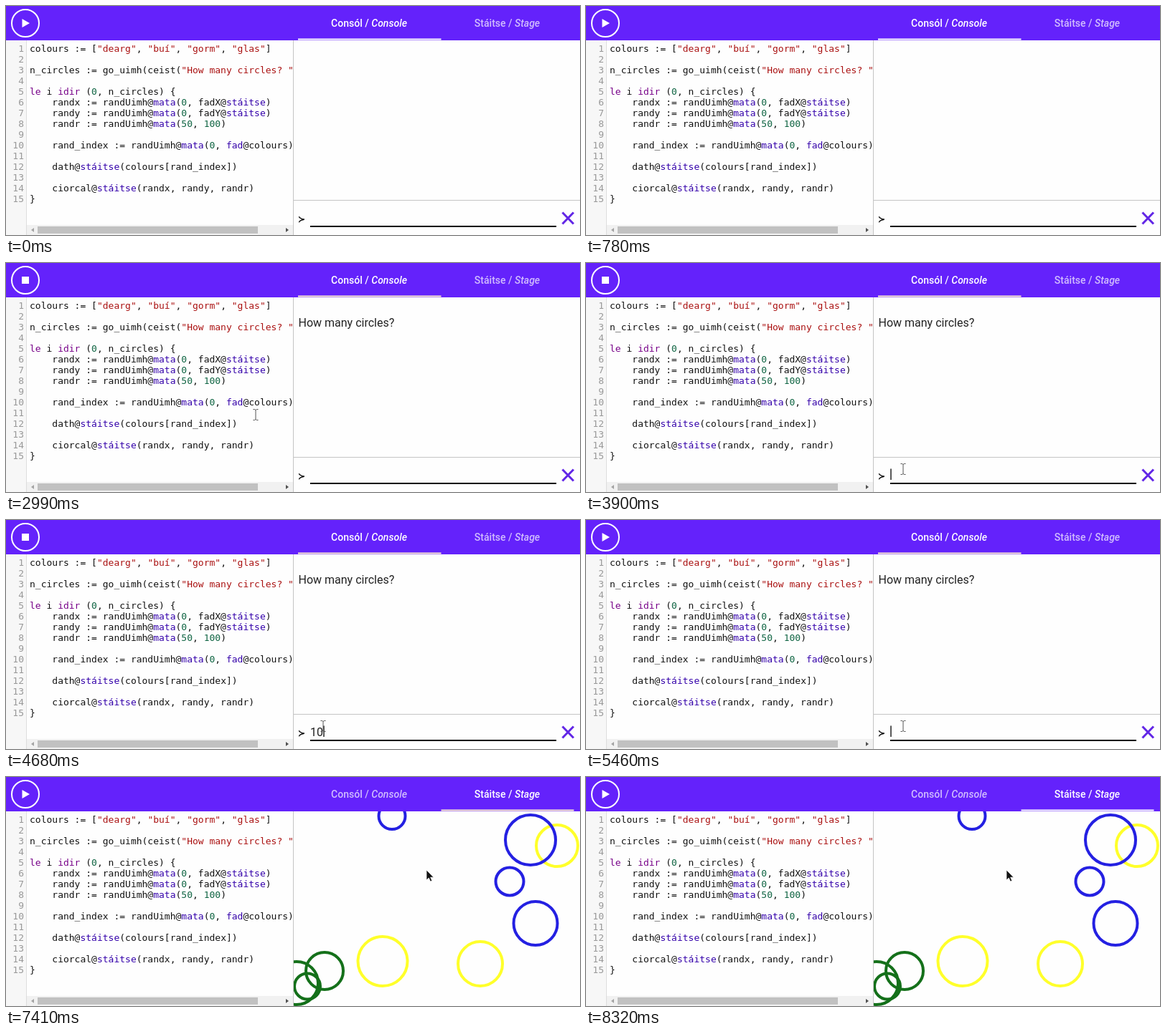
Animation of 800x320 px, one loop 8450 ms. Source, as an HTML page:

```html
<!DOCTYPE html>
<html lang="ga">
<head>
<meta charset="utf-8">
<title>Circles on the stage</title>
<style>
html, body { margin: 0; width: 100%; height: 100%; overflow: hidden; background: #fff; }
#app { position: relative; width: 800px; height: 320px; overflow: hidden; background: #fefefe; }
#app > * { position: absolute; }
#gutter { left: 0; top: 48px; width: 28px; height: 272px; background: #f7f7f7; border-right: 1px solid #ddd; }
pre { margin: 0; top: 52px; font: 13px/15px "DejaVu Sans Mono", monospace; color: #111; }
#numbers { left: 0; width: 25px; text-align: right; color: #999; }
#code { left: 33px; width: 367px; overflow: hidden; }
.string { color: #a11; } .keyword { color: #708; } .builtin { color: #30a; } .number { color: #164; }
svg { left: 0; top: 0; }
.tab { font: 500 14px Roboto, sans-serif; fill: #fff; text-anchor: middle; }
.tab tspan { font-style: italic; }
.console { font: 16px Roboto, sans-serif; fill: #212121; }
.prompt { font: 12px "DejaVu Sans", sans-serif; }
</style>
</head>
<body>
<div id="app">
  <div id="gutter"></div>
  <pre id="numbers"></pre>
  <pre id="code"></pre>
  <svg width="800" height="320" viewBox="0 0 800 320">
    <defs><clipPath id="pane"><path d="M401 48H800V320H401Z"/></clipPath></defs>

    <path d="M29 306H400V320H29Z" fill="#f1f1f1"/>
    <path d="M44 308H351V318H44Z" fill="#c1c1c1"/>
    <path d="M39 310V316L35 313Z" fill="#a3a3a3"/>
    <path d="M390 310V316L394 313Z" fill="#505050"/>
    <path d="M400.5 48V320" stroke="#c4c4c4"/>

    <path d="M0 0H800V48H0Z" fill="#6422fb"/>
    <circle cx="27" cy="24" r="19" fill="none" stroke="#fff" stroke-width="2"/>
    <path id="play" d="M22.5 18V30L33 24Z" fill="#fff"/>
    <path id="stop" d="M22 19H32V29H22Z" fill="#fff"/>
    <text id="consoleTab" class="tab" x="506" y="28.5">Consól / <tspan>Console</tspan></text>
    <text id="stageTab" class="tab" x="698.5" y="28.5">Stáitse / <tspan>Stage</tspan></text>
    <rect id="underline" y="45.5" height="2"/>

    <g id="console">
      <text id="question" class="console" x="407.5" y="89">How many circles?</text>
      <path d="M401 271.5H800" stroke="#c4c4c4"/>
      <text class="prompt" x="407" y="302" stroke="#000" stroke-width=".4">≻</text>
      <path d="M424 308H767" stroke="#000" stroke-width="2"/>
      <path d="M775.5 288.5L791 304.5M791 288.5L775.5 304.5" stroke="#6226e6" stroke-width="3"/>
      <text id="typed" class="console" x="424" y="302"></text>
      <path id="caret" d="M425 287.5V303" stroke="#000" stroke-width="1.3"/>
    </g>
    <g id="stage" clip-path="url(#pane)" fill="none" stroke-width="4"></g>

    <g id="pointer">
      <path id="beam" d="M-3.5 -7.5H-1.5L0 -6.5L1.5 -7.5H3.5M0 -6.5V6.5M-3.5 7.5H-1.5L0 6.5L1.5 7.5H3.5" fill="none" stroke="#555"/>
      <path id="arrow" d="M0 0V14L3.3 11L5.5 16L7.8 15L5.6 10.2H10Z" fill="#111" stroke="#fff" stroke-width=".7"/>
      <path id="hand" d="M-1.5 1Q0 -1 1.5 1V6L8 7.5Q9.5 8 9 11L7.5 16H0L-5 10Q-4 7.5 -1.5 9.5Z" fill="#111" stroke="#fff"/>
    </g>
  </svg>
</div>
<script>
const $ = id => document.getElementById(id);
const LOOP = 8450, STEP = 130;

const program = `colours := ["dearg", "buí", "gorm", "glas"]

n_circles := go_uimh(ceist("How many circles? "))

le i idir (0, n_circles) {
    randx := randUimh@mata(0, fadX@stáitse)
    randy := randUimh@mata(0, fadY@stáitse)
    randr := randUimh@mata(50, 100)

    rand_index := randUimh@mata(0, fad@colours)

    dath@stáitse(colours[rand_index])

    ciorcal@stáitse(randx, randy, randr)
}`;
const token = /(?<string>"[^"]*")|(?<keyword>\b(?:le|idir)\b)|(?<builtin>mata|stáitse|\bfad(?=@))|(?<number>\b\d+)/g;
$('code').innerHTML = program.replace(token, (text, ...rest) => {
  const groups = rest.at(-1);
  const kind = Object.keys(groups).find(name => groups[name]);
  return `<span class="${kind}">${text}</span>`;
});
$('numbers').textContent = program.split('\n').map((_, i) => i + 1).join('\n');

const BLUE = '#2420e2', YELLOW = '#ffff2a', GREEN = '#14701a';
const circles = [
  [538, 54.5, 18.5, BLUE], [768, 96, 29, YELLOW], [731, 88, 35, BLUE],
  [702, 146, 19.5, BLUE], [738, 204.5, 30.5, BLUE], [525, 257.5, 34.5, YELLOW],
  [661, 261, 31, YELLOW], [444, 271, 26, GREEN], [405, 288, 30, GREEN], [420, 292.5, 18, GREEN]
];
$('stage').innerHTML = circles.map(([x, y, r, colour]) =>
  `<circle cx="${x}" cy="${y}" r="${r}" stroke="${colour}"/>`).join('');

// time, x, y
const path = [
  [1040, 330, 325], [1560, 214, 104], [2080, 31, 27], [2470, 31, 27],
  [2990, 348, 212], [3510, 442, 288], [5590, 442, 288],
  [6240, 700, 30], [6630, 700, 30], [7280, 586, 130], [LOOP, 586, 130]
];
const RUN = 2340, FOCUS = 3640, ENTER = 5200, SWITCH = 6500;
const caretOn = [[FOCUS, 4160], [4420, 5720], [6240, SWITCH]];

const within = (t, from, to) => t >= from && t < to;
const show = (id, on) => $(id).style.display = on ? '' : 'none';
const mix = (a, b, p) => a + (b - a) * p;
const ease = p => p * p * (3 - 2 * p);
const clamp = p => Math.max(0, Math.min(1, p));

function pointerAt(t) {
  const i = path.findIndex(([end]) => t < end);
  const [t0, x0, y0] = path[i - 1], [t1, x1, y1] = path[i];
  const p = (t - t0) / (t1 - t0);
  return [mix(x0, x1, p), mix(y0, y1, p)];
}

function pointerKind(x, y) {
  if (y < 48) return x < 47 || x > 407 ? 'hand' : 'arrow';
  if (x < 400) return y < 306 ? 'beam' : 'arrow';
  return y > 284 && x > 424 && x < 767 ? 'beam' : 'arrow';
}

function draw(t) {
  const running = within(t, RUN, ENTER), onStage = t >= SWITCH;
  show('play', !running);
  show('stop', running);
  show('question', t >= RUN);
  show('console', !onStage);
  show('stage', onStage);
  $('consoleTab').setAttribute('fill-opacity', onStage ? .7 : 1);
  $('stageTab').setAttribute('fill-opacity', onStage ? 1 : .7);

  const slide = ease(clamp((t - SWITCH) / 260));
  $('underline').setAttribute('x', mix(407, 606.5, slide));
  $('underline').setAttribute('width', mix(199.5, 185, slide));
  $('underline').setAttribute('fill', within(t, 910, 7930) ? '#fff0d0' : '#fff');

  const typed = t >= ENTER ? '' : t >= 4680 ? '10' : t >= 4420 ? '1' : '';
  $('typed').textContent = typed;
  $('caret').setAttribute('transform', `translate(${typed.length * 9} 0)`);
  show('caret', caretOn.some(([from, to]) => within(t, from, to)));

  const visible = t >= path[0][0];
  show('pointer', visible);
  if (visible) {
    const [x, y] = pointerAt(t), kind = pointerKind(x, y);
    $('pointer').setAttribute('transform', `translate(${x} ${y})`);
    for (const id of ['beam', 'arrow', 'hand']) show(id, id === kind);
  }
}

const start = performance.now();
function tick() {
  const t = (performance.now() - start) % LOOP;
  draw(Math.floor(t / STEP) * STEP);
  requestAnimationFrame(tick);
}
tick();
</script>
</body>
</html>
```
